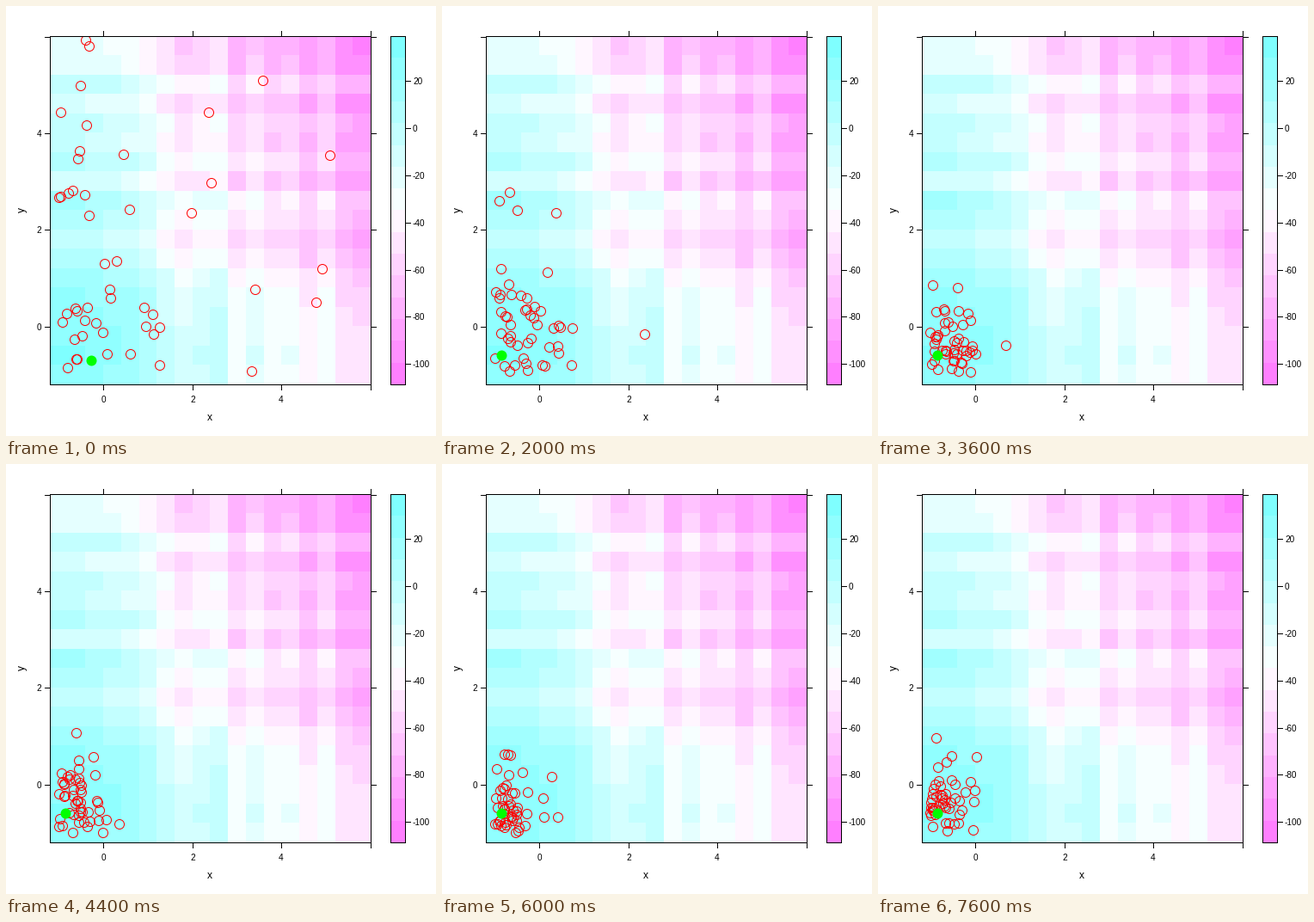
These frames come from a looping animation (500 px wide and 500 px high, 8 s). A matplotlib script:

```python
import numpy as np
import matplotlib.pyplot as plt
from matplotlib.animation import FuncAnimation
from matplotlib.colors import ListedColormap
from matplotlib.patches import Rectangle

SIZE, DPI = 500, 100
GENERATIONS, INTERVAL = 20, 400
POPULATION, CANDIDATES = 49, 6000
LOW, HIGH, STEP = -1, 6, 0.4
LEFT, RIGHT, TOP, BOTTOM = 51, 424, 35, 440
KEY_LEFT, KEY_RIGHT = 447, 464
LEVELS = 16
FONT = "Liberation Sans"
PX = 72 / DPI


def fitness(x, y):
    return 10 * np.cos(x ** 2) + 10 * np.cos(y ** 2) - 10 * x - 5 * y


def to_pixels(x, y):
    """Plot coordinates, whose axes run from -1.2 to 6, as stage pixels."""
    span = HIGH - LOW + STEP / 2
    across = (np.asarray(x) - LOW + STEP / 2) / span
    up = (np.asarray(y) - LOW + STEP / 2) / span
    return np.column_stack([np.round(LEFT + across * (RIGHT - LEFT)),
                            np.round(BOTTOM + .5 - up * (BOTTOM - TOP))])


def level_colors():
    """Magenta through white to cyan."""
    colors = []
    for t in np.linspace(-1, 1, LEVELS):
        fade = 1 - abs(t) / 2
        colors.append((1, fade, 1) if t < 0 else (fade, 1, 1))
    return ListedColormap(colors)


def crowd(generation):
    """Random points favouring high fitness, more strictly as time passes."""
    rng = np.random.default_rng(40 + generation)
    x, y = rng.uniform(LOW, HIGH, (2, CANDIDATES))
    temperature = 2 + 17 * np.exp(-generation / 4)
    weight = np.exp(fitness(x, y) / temperature)
    chosen = rng.choice(CANDIDATES, POPULATION, replace=False,
                        p=weight / weight.sum())
    return to_pixels(x[chosen], y[chosen])


def best(generation):
    start, goal = np.array([-.27, -.7]), np.array([-.86, -.58])
    x, y = goal + (start - goal) * np.exp(-generation)
    return to_pixels(x, y)


fig = plt.figure(figsize=(SIZE / DPI, SIZE / DPI), dpi=DPI, facecolor="white")
ax = fig.add_axes([0, 0, 1, 1])
ax.axis("off")


def line(x0, y0, x1, y1):
    ax.plot([x0, x1], [y0, y1], color="black", lw=PX, antialiased=False, zorder=5)


def box(left, right):
    ax.add_patch(Rectangle((left, TOP), right - left, BOTTOM - TOP, fill=False,
                           lw=PX, ec="black", antialiased=False, zorder=5))


def label(x, y, text, size=10, **kwargs):
    kwargs = {"ha": "center", "va": "center_baseline", **kwargs}
    ax.text(x, y, text, family=FONT, fontsize=size * PX, **kwargs)


def heat(values, left, right):
    ax.imshow(values, cmap=level_colors(), vmin=-.5, vmax=LEVELS - .5,
              aspect="auto", interpolation="nearest",
              extent=(left, right, BOTTOM, TOP))


grid = np.arange(LOW, HIGH, STEP)
surface = fitness(grid, grid[::-1, None])
padding = .07 * np.ptp(surface)
bounds = np.linspace(surface.min() - padding, surface.max() + padding, LEVELS + 1)
heat(np.digitize(surface, bounds) - 1, LEFT, RIGHT)
heat(np.arange(LEVELS)[::-1, None], KEY_LEFT, KEY_RIGHT)
box(LEFT, RIGHT)
box(KEY_LEFT, KEY_RIGHT)

for value in range(0, 7, 2):
    x, y = to_pixels(value, value)[0]
    line(x, BOTTOM, x, BOTTOM + 6)
    line(x, TOP, x, TOP - 6)
    line(LEFT, y, LEFT - 6, y)
    line(RIGHT, y, RIGHT + 6, y)
    if value < 6:
        label(x, 457, value)
        label(41, y, value, ha="right")

for value in range(-100, 21, 20):
    y = round(142 - value * 2.742)
    line(KEY_RIGHT, y, KEY_RIGHT + 6, y)
    label(473, y, value, ha="left")

label(236.5, 478, "x", 12)
label(19, 237.5, "y", 12, rotation=90, va="center")

ax.set_xlim(0, SIZE)
ax.set_ylim(SIZE, 0)

rings = ax.scatter([], [], s=(11 * PX) ** 2, facecolors="none", edgecolors="red",
                   linewidths=PX, zorder=3)
leader = ax.scatter([], [], s=(12 * PX) ** 2, color="lime", linewidths=0, zorder=4)
for dots in (rings, leader):
    dots.set_clip_path(Rectangle((LEFT, TOP), RIGHT - LEFT, BOTTOM - TOP,
                                 transform=ax.transData))


def update(generation):
    rings.set_offsets(crowd(generation))
    leader.set_offsets(best(generation))
    return rings, leader


animation = FuncAnimation(fig, update, frames=GENERATIONS, interval=INTERVAL,
                          repeat=True, repeat_delay=0)
plt.show()
```
